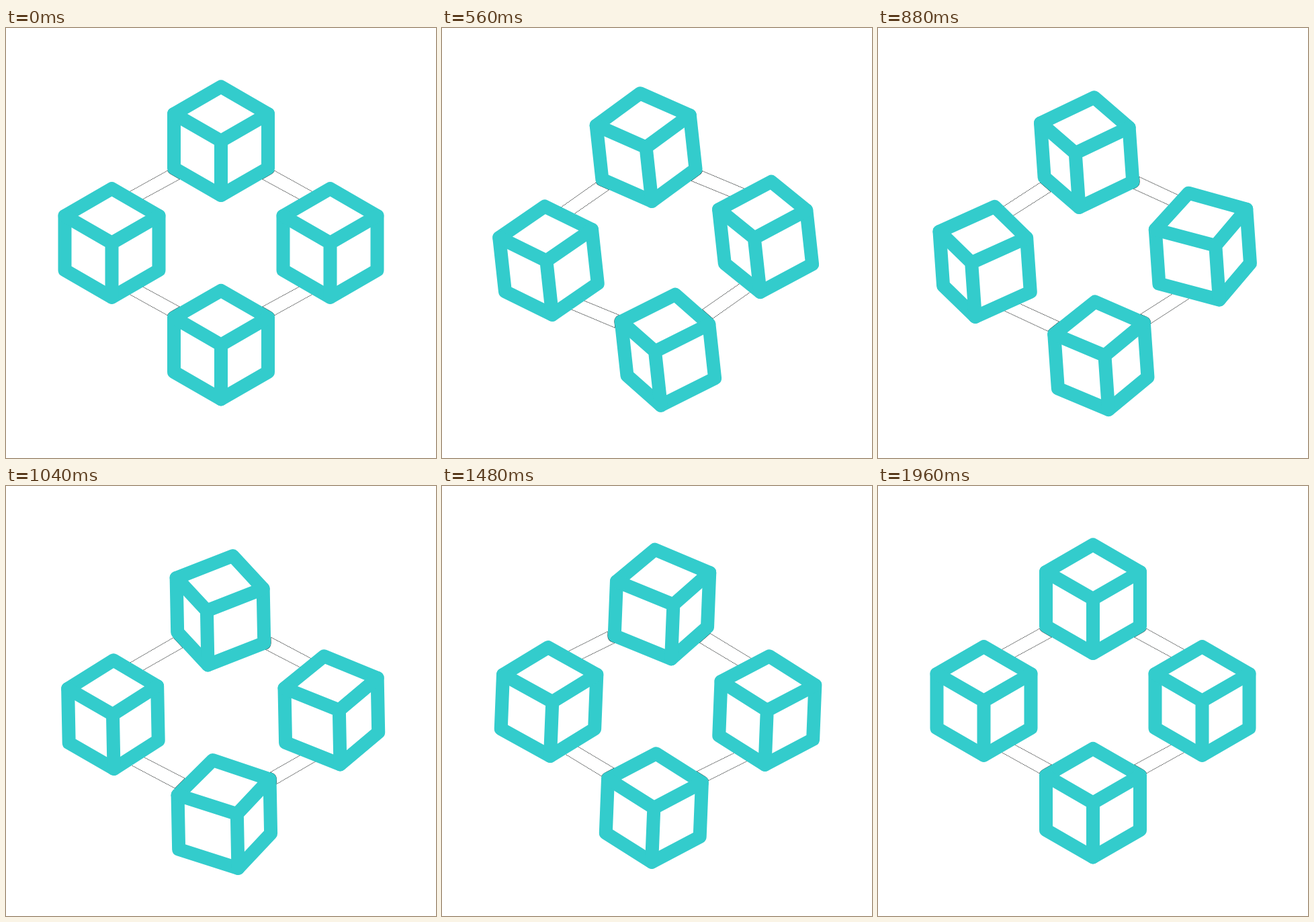
An HTML page with a canvas that plays this animation: 640x640 px, repeating every 2080 ms.

```html
<!DOCTYPE html>
<html lang="en">
<head>
<meta charset="utf-8">
<title>Linked cubes</title>
<style>
  html, body { margin: 0; width: 100%; height: 100%; overflow: hidden; background: #fff; }
  canvas { display: block; }
</style>
</head>
<body>
<canvas id="stage" width="640" height="640"></canvas>
<script>
const ctx = document.getElementById('stage').getContext('2d');
const LOOP = 2080, STEP = 40;
const TEAL = '#33cccc', DARK = '#1c2020';

// Sine-eased value between keyframes, held outside them
function ease(t, times, values) {
  if (t <= times[0]) return values[0];
  for (let i = 1; i < times.length; i++) {
    if (t < times[i]) {
      const p = (t - times[i - 1]) / (times[i] - times[i - 1]);
      return values[i - 1] + (values[i] - values[i - 1]) * (1 - Math.cos(Math.PI * p)) / 2;
    }
  }
  return values[values.length - 1];
}

// Cube centres relative to the group, and when each one starts its swing
const cubes = [
  { x: 162.5, y: 0, delay: 0 },
  { x: 0, y: 151.6, delay: 160 },
  { x: -162.5, y: 0, delay: 360 },
  { x: 0, y: -151.8, delay: 520 }
];

const SWING = [110, 470, 880, 1250];

function cubePaths({ x, y, delay }, t) {
  const swing = values => ease(t - delay, SWING, values);
  const dx = swing([0, -21.5, 17.3, 0]);
  const half = swing([70, 64.2, 68.7, 70]);
  const dy = swing([0, -10, 10.4, 0]);
  const mid = x + swing([0, 0, 1.7, 0]);
  const depth = 40.4, h = 40.4;

  const outline = new Path2D(), inner = new Path2D();
  outline.moveTo(mid - dx, y - h - depth);
  outline.lineTo(x + half, y - h - dy);
  outline.lineTo(x + half, y + h - dy);
  outline.lineTo(mid + dx, y + h + depth);
  outline.lineTo(x - half, y + h + dy);
  outline.lineTo(x - half, y - h + dy);
  outline.closePath();

  inner.moveTo(x - half, y - h + dy);
  inner.lineTo(mid + dx, y - h + depth);
  inner.lineTo(x + half, y - h - dy);
  inner.moveTo(mid + dx, y - h + depth);
  inner.lineTo(mid + dx, y + h + depth);
  return { outline, inner };
}

function stroke(path, color, width) {
  ctx.strokeStyle = color;
  ctx.lineWidth = width;
  ctx.stroke(path);
}

const links = new Path2D(), bars = new Path2D();
for (const sx of [-1, 1]) {
  for (const sy of [-1, 1]) {
    const at = (x, y) => [sx * x, sy * y];
    links.moveTo(...at(144, 72));
    links.lineTo(...at(70, 113));
    links.moveTo(...at(124, 61));
    links.lineTo(...at(54, 99));
    bars.moveTo(...at(144, 72));
    bars.lineTo(...at(70, 113));
    bars.lineTo(...at(54, 99));
    bars.lineTo(...at(124, 61));
    bars.closePath();
  }
}

function draw(t) {
  const drift = ease(t, [500, 1180, 1960], [0, 2.1, 0]);
  const lift = ease(t, [160, 960, 1100, 1810], [0, 17, 17, 0]);
  const turn = ease(t, [70, 620, 1370, 1960], [0, -6.4, 2.5, 0]);

  ctx.setTransform(1, 0, 0, 1, 0, 0);
  ctx.fillStyle = '#fff';
  ctx.fillRect(0, 0, 640, 640);
  ctx.translate(320 + drift, 320 + lift);
  ctx.rotate(turn * Math.PI / 180);
  ctx.lineJoin = ctx.lineCap = 'round';

  ctx.save();
  ctx.lineCap = 'butt';
  ctx.setLineDash([1.5, 0.9]);
  stroke(links, DARK, 0.9);
  ctx.restore();

  for (const cube of cubes) {
    const { outline, inner } = cubePaths(cube, t);
    // Thin dark rim where a link meets the upper and lower cubes
    if (cube.x === 0) {
      ctx.save();
      ctx.clip(bars);
      stroke(outline, DARK, 20.6);
      ctx.restore();
    }
    ctx.fill(outline);
    stroke(outline, TEAL, 20);
    stroke(inner, TEAL, 20);
  }
}

const start = performance.now();
function frame() {
  const t = (performance.now() - start) % LOOP;
  draw(Math.floor(t / STEP) * STEP);
  requestAnimationFrame(frame);
}
frame();
</script>
</body>
</html>
```
